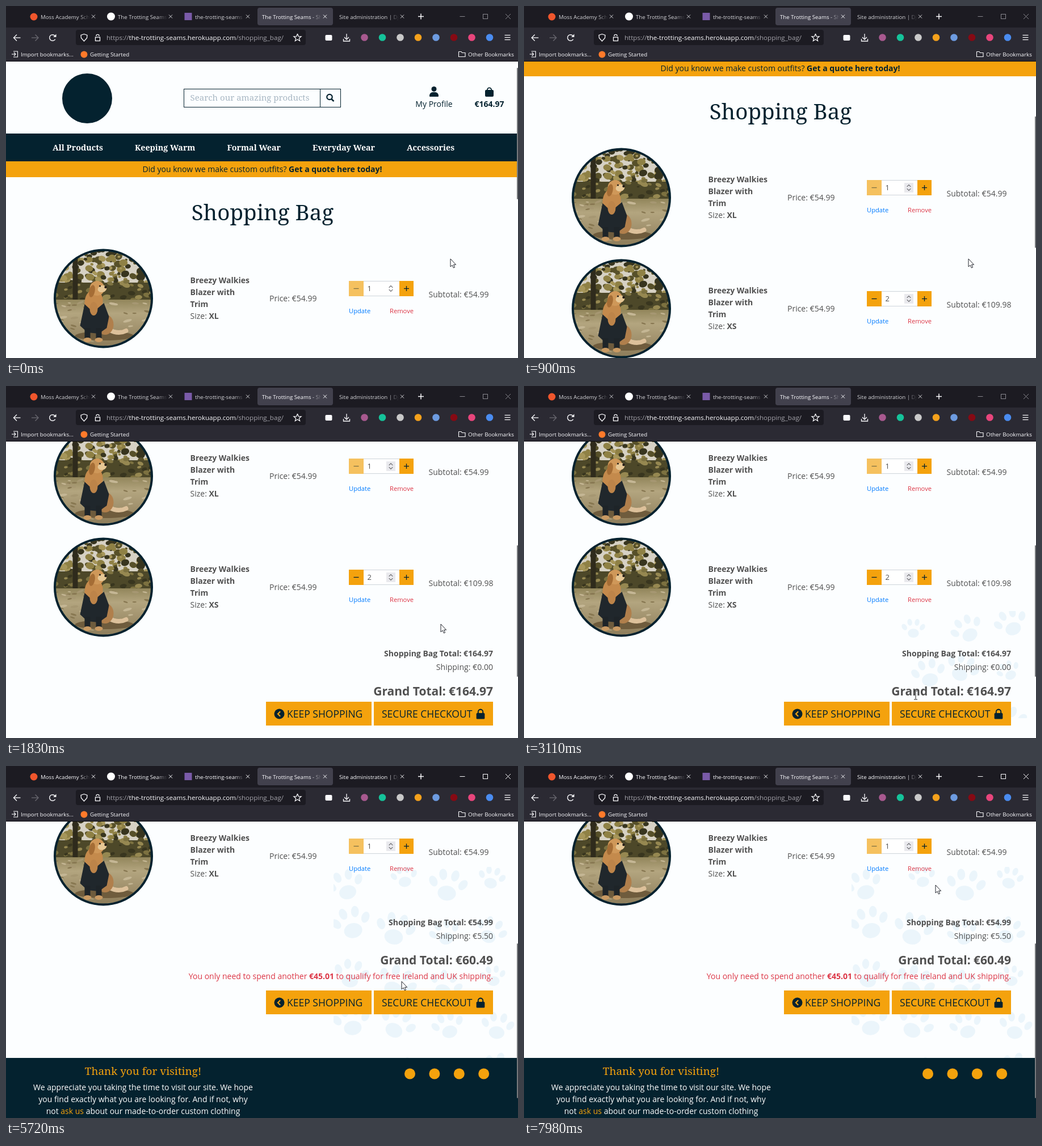
Recreate the animation shown at these times as an HTML page with a canvas. Size 902 by 621 pixels, loop 8000 ms.

```html
<!DOCTYPE html>
<html lang="en">
<head>
<meta charset="utf-8">
<title>Shopping Bag</title>
<style>
html, body { margin: 0; width: 100%; height: 100%; overflow: hidden; background: #fcfeff; }
canvas { display: block; }
</style>
</head>
<body>
<canvas id="stage" width="902" height="621"></canvas>
<script>
const g = document.getElementById('stage').getContext('2d');
const LOOP = 8000, TICK = 120, TOP = 98, { PI, sin, cos } = Math;
const FOCUS = 5340, RELOAD = 5580, REMOVED = 5720, TOAST = 5870, FADE = 7350, GONE = 7470;
const NAVY = '#04222f', ORANGE = '#f4a20d', PAGE = '#fcfeff', GREY = '#505050',
  RED = '#dc3545', BLUE = '#007bff', UI = '#fbfbfe';
const sans = (px, weight = 400) => `${weight} ${px}px "Open Sans", sans-serif`;
const serif = (px, weight = 400) => `${weight} ${px}px "Noto Serif", serif`;
const BODY = sans(14), BOLD = sans(14, 700);
const ITEM = ['Breezy Walkies', 'Blazer with', 'Trim'];

// Motion: the picture advances in ticks, between a few [time, ...values] keys.
const onTick = t => Math.max(0, Math.floor((t - 60) / TICK) * TICK + 60);
function track(keys, t) {
  const i = keys.findIndex(k => k[0] > t);
  if (i < 0) return keys[keys.length - 1].slice(1);
  const a = keys[i - 1], b = keys[i], u = (t - a[0]) / (b[0] - a[0]);
  return a.slice(1).map((v, j) => v + (b[j + 1] - v) * u);
}
const SCROLL = [[0, 0], [540, 0], [900, 178], [1140, 295], [1260, 357]];
const CIRCLE = { from: 1860, to: 3300, x: 757, y: 503, rx: 90, ry: 63, speed: .49 * PI / 180 };
const BEFORE = [[0, 783, 446], [1380, 783, 446], [1740, 766, 420]];
const AFTER = [
  [3300, 780, 442], [3960, 616, 346], [4620, 609, 343], [4740, 661, 360], [5100, 697, 380],
  [6180, 697, 380], [6420, 871, 279], [6660, 881, 193], [6900, 881, 193], [7020, 875, 203],
  [7380, 875, 203], [7740, 819, 209], [7980, 725, 210]
];
function pointerAt(t) {
  if (t < CIRCLE.from) return track(BEFORE, t);
  if (t > CIRCLE.to) return track(AFTER, t);
  const a = (t - CIRCLE.from) * CIRCLE.speed - PI / 2;
  return [CIRCLE.x + CIRCLE.rx * cos(a), CIRCLE.y + CIRCLE.ry * sin(a)];
}

function seeded(seed) {
  const next = () => (seed = seed * 16807 % 2147483647) / 2147483647;
  return (lo, hi) => lo + next() * (hi - lo);
}
function box(x, y, w, h, color) { g.fillStyle = color; g.fillRect(x, y, w, h); }
function rounded(x, y, w, h, r, color) {
  g.beginPath(); g.roundRect(x, y, w, h, r); g.fillStyle = color; g.fill();
}
function oval(x, y, rx, ry, color, turn = 0) {
  g.beginPath(); g.ellipse(x, y, rx, ry, turn, 0, 7); g.fillStyle = color; g.fill();
}
const dot = (x, y, r, color) => oval(x, y, r, r, color);
function shape(pts, color) {
  g.beginPath(); pts.forEach(p => g.lineTo(...p)); g.closePath(); g.fillStyle = color; g.fill();
}
function line(pts, color, width = 1.3) {
  g.beginPath(); pts.forEach(p => g.lineTo(...p));
  g.strokeStyle = color; g.lineWidth = width; g.stroke();
}
function ring(x, y, r, color, width = 1.3, from = 0, to = 7) {
  g.beginPath(); g.arc(x, y, r, from, to); g.strokeStyle = color; g.lineWidth = width; g.stroke();
}
function frame(x, y, w, h, color, width = 1) {
  g.strokeStyle = color; g.lineWidth = width; g.strokeRect(x + .5, y + .5, w - 1, h - 1);
}
function dash(x, y, r, color, width = 1.3) { line([[x - r, y], [x + r, y]], color, width); }
function plus(x, y, r, color, width) { dash(x, y, r, color, width); line([[x, y - r], [x, y + r]], color, width); }
function cross(x, y, r, color, width) {
  line([[x - r, y - r], [x + r, y + r]], color, width);
  line([[x - r, y + r], [x + r, y - r]], color, width);
}
// Open arrow head with its tip at x, y; dx, dy give the direction and size
function chevron(x, y, dx, dy, color, width) {
  line([[x - dx + dy, y - dy + dx], [x, y], [x - dx - dy, y - dy - dx]], color, width);
}
function text(s, x, y, font, color, align = 'left') {
  g.font = font; g.fillStyle = color; g.textAlign = align; g.fillText(s, x, y);
}
// parts: [string, font, color]; align: 0 left, .5 centre, 1 right
function rich(parts, x, y, align = 0) {
  const widths = parts.map(([s, f]) => (g.font = f, g.measureText(s).width));
  x -= align * widths.reduce((a, b) => a + b);
  parts.forEach(([s, f, c], i) => { text(s, x, y, f, c); x += widths[i]; });
}
function clipped(x, y, w, h, draw) {
  g.save(); g.beginPath(); g.rect(x, y, w, h); g.clip(); draw(); g.restore();
}
function lock(x, y, s, color) {
  const arch = [-4, 4].map(d => [x + d * s, y]);
  line([arch[0], [x - 4 * s, y - 3 * s]], color, 2 * s);
  line([arch[1], [x + 4 * s, y - 3 * s]], color, 2 * s);
  ring(x, y - 3 * s, 4 * s, color, 2 * s, PI, 2 * PI);
  rounded(x - 7 * s, y - s, 14 * s, 10 * s, 1.5 * s, color);
}

function tabs(ink) {
  const names = ['Moss Academy School', 'The Trotting Seams', 'the-trotting-seams',
    'The Trotting Seams - Shop', 'Site administration | Django'];
  rounded(443, 3, 133, 31, 4, '#42414d');
  names.forEach((name, i) => {
    const left = i * 136, x = left + (i < 3 ? 61 : 43);
    const color = i === 3 ? UI : ink;
    const fade = g.createLinearGradient(left + 130, 0, left + 148, 0);
    fade.addColorStop(0, color); fade.addColorStop(1, color + '00');
    clipped(x, 4, left + 147 - x, 30, () => text(name, x, 23, sans(9.7), fade));
    cross(left + 154, 18.5, 3, color, 1);
  });
  dot(49, 19, 6.5, '#f0562c');
  dot(185, 18.5, 7, '#ffffff');
  box(314.5, 12, 13, 13, '#7a5ba8');
  plus(731, 18.5, 5, UI, 1.5);
}
function addressBar() {
  rounded(123, 42, 405, 27, 4, '#1c1b22');
  line([[137.5, 49.5], [143, 51.5], [142.5, 56.5], [137.5, 62], [132.5, 56.5], [132, 51.5], [137.5, 49.5]], UI);
  ring(161.5, 53, 2.7, UI, 1.3, PI, 2 * PI);
  frame(157, 54.5, 9, 7.5, UI, 1.3);
  const dim = '#a4a3aa', url = sans(11.6);
  rich([['https://', url, dim], ['the-trotting-seams.herokuapp.com', url, UI], ['/shopping_bag/', url, dim]], 177, 60);
  const star = Array.from({ length: 11 }, (_, i) => {
    const r = i % 2 ? 3 : 7, a = i * PI / 5 - PI / 2;
    return [513.5 + r * cos(a), 56 + r * sin(a)];
  });
  line(star, UI, 1.2);
}
function chrome(focused) {
  const ctl = focused ? UI : '#88878e';
  box(0, 0, 902, 38, '#1c1b22');
  box(0, 38, 902, 60, '#2b2a33');
  box(0, 97, 902, 1, '#0d0c12');
  tabs(focused ? UI : '#d2d2d6');
  dash(804, 18.5, 4.5, ctl, 1);
  frame(840, 14, 9, 9, ctl);
  cross(884.5, 18.5, 4.5, ctl, 1);

  dash(19.5, 56, 6, UI); chevron(13.5, 56, -5.5, 0, UI);
  dash(51, 56, 6, '#6b6a72'); chevron(57, 56, 5.5, 0, '#6b6a72');
  ring(82, 56, 5.3, UI, 1.4, .5, 5.6);
  shape([[88.5, 49.5], [88.5, 54.8], [83.2, 54.8]], UI);
  addressBar();
  rounded(562.5, 51, 12, 10, 2, UI);
  line([[600, 49], [600, 59]], UI); chevron(600, 59, 0, 4, UI);
  line([[594.5, 58], [594.5, 62], [605.5, 62], [605.5, 58]], UI);
  ['#a8598f', '#15c39a', '#c9c9c9', '#f5a11c', '#6d9be0', '#860a14', '#e8457c', '#4a8cf0']
    .forEach((color, i) => dot(631.5 + i * 31.5, 55.5, 6.3, color));
  for (let y = 51.5; y < 60; y += 4) dash(883.5, y, 5, UI, 1.2);

  line([[13, 80], [20.5, 80], [20.5, 90], [13, 90]], UI, 1.1);
  dash(13.5, 85, 3.5, UI, 1.1); chevron(17, 85, 3, 0, UI, 1.1);
  text('Import bookmarks...', 26, 89, sans(9.8), UI);
  dot(137.5, 85.5, 6, '#ff7a2a');
  text('Getting Started', 148, 89, sans(9.8), UI);
  line([[797.5, 80.5], [802, 80.5], [803.5, 82.5], [809, 82.5], [809, 89.5], [797.5, 89.5], [797.5, 80.5]], UI, 1.1);
  text('Other Bookmarks', 814, 89, sans(9.8), UI);
}

function paw(x, y, s, turn) {
  const color = '#ebf5fb';
  g.save(); g.translate(x, y); g.rotate(turn);
  oval(0, s * .3, s * .42, s * .34, color);
  [-1.15, -.38, .38, 1.15].forEach(a =>
    oval(sin(a) * s * .75, s * .12 - cos(a) * s * .7, s * .18, s * .26, color, a * .5));
  g.restore();
}
function paws(x, y, w, h, seed) {
  const rnd = seeded(seed), step = 84;
  clipped(x, y, w, h, () => {
    for (let py = y + 30; py < y + h + 30; py += step)
      for (let px = x + 36; px < x + w + 36; px += step)
        paw(px + rnd(-14, 14), py + rnd(-14, 14), rnd(22, 40), rnd(-.7, .7));
  });
}

function speckle(rnd, count, top, bottom, flat, colors) {
  for (let i = 0; i < count; i++) {
    const r = rnd(2, 8);
    oval(rnd(-88, 88), rnd(top, bottom), r, r * flat, colors[i % colors.length], rnd(-.4, .4));
  }
}
function dog() {
  oval(2, 66, 52, 8, '#6f5c3d');
  g.beginPath(); g.moveTo(10, 55); g.quadraticCurveTo(26, 64, 40, 57);
  g.lineWidth = 8; g.lineCap = 'round'; g.strokeStyle = '#dcc09a'; g.stroke();
  oval(3, 46, 15, 18, '#b07f4c');
  oval(-17, 6, 16, 22, '#c48a4c', .1);
  shape([[-33, 10], [-18, 24], [1, 8], [10, 32], [6, 52], [-8, 62], [-28, 60], [-41, 48]], '#20272c');
  oval(-17, 18, 7, 12, '#bd8449');
  [-28, -8].forEach(x => { box(x - 5, 52, 10, 20, '#1e2428'); oval(x, 73, 7, 4, '#c99a63'); });
  oval(-11, -18, 13, 13, '#cf9859');
  oval(-2, -17, 8, 6, '#e6c795', -.3);
  oval(-20, -13, 5, 11, '#a56d35', .2);
  dot(4, -20, 2.2, '#251d17'); dot(-6, -22, 1.6, '#251d17');
}
function photo(x, y, scale) {
  const rnd = seeded(77);
  g.save(); g.translate(x, y); g.scale(scale, scale);
  const ground = g.createLinearGradient(0, 0, 0, 88);
  ground.addColorStop(0, '#8f8358'); ground.addColorStop(.3, '#b3a57f'); ground.addColorStop(1, '#8b7a58');
  box(-88, -88, 176, 90, '#d6d1c4');
  speckle(rnd, 150, -88, -22, .8, ['#575029', '#8f8145', '#38351f', '#a6965a']);
  box(-88, -28, 176, 32, '#4d4829');
  speckle(rnd, 45, -32, 2, .6, ['#7c7140', '#39361f', '#968851']);
  box(-54, -88, 9, 92, '#2f2b1c');
  box(-88, 2, 176, 86, ground);
  speckle(rnd, 70, 6, 88, .3, ['#c4b694', '#877751', '#a69772']);
  dog();
  g.restore();
}

function item(y, size, qty, subtotal, hovered) {
  g.save();
  g.beginPath(); g.arc(171.5, y, 86, 0, 7); g.clip();
  photo(171.5, y, 1);
  g.restore();
  ring(171.5, y, 85.5, NAVY, 4);
  ITEM.forEach((s, i) => text(s, 324.5, y - 27 + i * 21, BOLD, GREY));
  rich([['Size: ', BODY, GREY], [size, BOLD, GREY]], 324.5, y + 36);
  text('Price: €54.99', 464, y + 5, BODY, GREY);
  box(630, y - 31, 63, 27, '#ffffff');
  frame(629, y - 31, 65, 27, '#ced4da');
  box(604, y - 31, 26, 27, qty > 1 ? ORANGE : '#f5c15f');
  box(693, y - 31, 25, 27, ORANGE);
  dash(617, y - 17.5, 4.5, qty > 1 ? NAVY : '#7d7244');
  plus(705.5, y - 17.5, 4.5, NAVY);
  text(qty, 636.5, y - 13, sans(13), GREY);
  if (hovered) box(670, y - 26, 16, 17, '#e9e9ed');
  chevron(678, y - 22.5, 0, -3.3, '#66666a', 1.1);
  chevron(678, y - 12.5, 0, 3.3, '#66666a', 1.1);
  text('Update', 604, y + 26, sans(11.2), BLUE);
  text('Remove', 676, y + 26, sans(11.2), RED);
  text('Subtotal: ' + subtotal, 744.5, y - 2, BODY, GREY);
}

function header() {
  dot(143, 163, 44, NAVY);
  frame(313, 146, 277, 33, NAVY);
  box(553, 146, 1, 33, NAVY);
  text('Search our amazing products', 324.5, 167, serif(15), '#a9b8c4');
  ring(570, 160.5, 4.7, NAVY, 2.2); line([[573.3, 164], [577.5, 168.2]], NAVY, 2.6);
  dot(754, 146.5, 4.5, NAVY);
  rounded(746, 152, 16, 8, [6, 6, 1, 1], NAVY);
  text('My Profile', 754, 178, BODY, NAVY, 'center');
  rounded(844, 148, 15, 12, 2, NAVY);
  ring(851.5, 148, 3.6, NAVY, 1.8, PI, 2 * PI);
  text('€164.97', 851.5, 178, BOLD, NAVY, 'center');
  box(0, 225, 902, 49, NAVY);
  let x = 82;
  for (const s of ['All Products', 'Keeping Warm', 'Formal Wear', 'Everyday Wear', 'Accessories']) {
    text(s, x, 255, serif(14.3, 700), '#ffffff');
    x += g.measureText(s).width + 56;
  }
  box(0, 274, 902, 28, ORANGE);
  rich([['Did you know we make custom outfits? ', BODY, NAVY], ['Get a quote here today!', BOLD, NAVY]], 451.5, 293, .5);
  text('Shopping Bag', 452, 378, serif(38.5), NAVY, 'center');
}

function buttons(y) {
  box(458, y, 186, 42, ORANGE); box(648, y, 210, 42, ORANGE);
  dot(481.5, y + 21.5, 9, NAVY);
  chevron(479, y + 21.5, -4.2, 0, ORANGE, 2.2);
  text('KEEP SHOPPING', 495, y + 28, sans(17.5), NAVY);
  text('SECURE CHECKOUT', 662, y + 28, sans(17.5), NAVY);
  lock(836, y + 21, 1.05, NAVY);
}
function totals(y, sum, shipping, grand) {
  text('Shopping Bag Total: ' + sum, 858, y, BOLD, GREY, 'right');
  text('Shipping: ' + shipping, 858, y + 24, BODY, GREY, 'right');
  text('Grand Total: ' + grand, 858, y + 69, sans(21, 700), GREY, 'right');
}
function footer(y) {
  box(0, y, 902, 200, NAVY);
  text('Thank you for visiting!', 241.5, y + 30, serif(18.9), ORANGE, 'center');
  const white = s => [s, BODY, '#ffffff'];
  [
    [white('We appreciate you taking the time to visit our site. We hope')],
    [white('you find exactly what you are looking for. And if not, why')],
    [white('not '), ['ask us', BODY, ORANGE], white(' about our made-to-order custom clothing')]
  ].forEach((parts, i) => rich(parts, 241.5, y + 57 + i * 21, .5));
  for (let i = 0; i < 4; i++) dot(711.5 + i * 43.4, y + 28, 9.5, ORANGE);
}

function toast(alpha, hover) {
  const small = sans(12.25), strong = sans(12.25, 700), tiny = sans(9.8), title = serif(13.1);
  g.save(); g.globalAlpha = alpha;
  g.save(); g.shadowColor = 'rgba(0,0,0,.18)'; g.shadowBlur = 8; g.shadowOffsetY = 3;
  box(586, 186, 305, 353, '#fdfeff'); g.restore();
  box(586, 185.5, 305, 2, '#28a745');
  text('Success!', 597, 207, title, NAVY);
  cross(874.5, 202.5, 4, hover ? '#303030' : '#9a9a9a', 1.6);
  text(`You removed XS ${ITEM[0]} ${ITEM[1]}`, 597, 244, title, NAVY);
  text(ITEM[2] + ' from your shopping bag', 597, 263, title, NAVY);
  text('Your Shopping Bag:', 597, 298, small, NAVY);
  clipped(597, 324, 51, 34, () => photo(622.5, 340, .31));
  text(ITEM.join(' '), 674, 334, small, GREY);
  text('Size: XL', 674, 350, tiny, GREY);
  text('Quantity: 1', 674, 365, tiny, GREY);
  text('Total (Exc. shipping)', 597, 436, strong, NAVY);
  text('€54.99', 880, 436, strong, NAVY, 'right');
  box(597, 444, 283, 51, NAVY);
  rich([['Spend ', small, '#fff'], ['€45.01', strong, '#ffc107'], [' more to get free shipping to the', small, '#fff']], 738.5, 465, .5);
  text('UK and Ireland.', 738.5, 483, small, '#fff', 'center');
  box(597, 495, 283, 33, ORANGE);
  text('GO TO SECURE CHECKOUT', 643, 517, BODY, NAVY);
  lock(828, 510.5, .8, NAVY);
  g.restore();
}

function outline(pts) {
  shape(pts, '#ffffff');
  line([...pts, pts[0]], '#20242c', 1);
}
function pointer(t) {
  const [x, y] = pointerAt(onTick(t)), listed = t < RELOAD;
  const over = (bx, by, w, h) => x > bx && x < bx + w && y > by && y < by + h;
  const onLink = listed
    ? over(648, 557, 210, 42) || over(604, 324, 26, 27) || over(676, 370, 42, 14)
    : t < GONE && over(868, 196, 12, 12);
  g.save(); g.translate(Math.round(x), Math.round(y));
  if (listed && over(646, 526, 212, 26)) {
    line([[0, -6], [0, 7]], '#222', 1);
    dash(0, -7, 3, '#222', 1); dash(0, 8, 3, '#222', 1);
  } else if (onLink) {
    outline([[-1.5, 0], [1, 0], [1, 6], [8, 7.5], [9, 9], [8, 16], [0, 16], [-5, 9.5], [-3.5, 8], [-1.5, 10]]);
  } else {
    outline([[0, 0], [0, 14], [3.2, 11.2], [5.4, 16], [7.6, 15], [5.5, 10.3], [9.6, 10.3]]);
  }
  g.restore();
}

function page(t) {
  const scroll = Math.round(track(SCROLL, onTick(t))[0]), removed = t >= REMOVED;
  box(0, TOP, 902, 523, PAGE);
  if (t >= RELOAD && !removed) return;
  if (removed) paws(577, 178, 325, 337, 5);
  else if (t >= CIRCLE.from + TICK) paws(664, 397, 238, 189, 12);

  g.save(); g.translate(0, -scroll);
  header();
  item(516, 'XL', 1, '€54.99', scroll > 0);
  if (removed) {
    totals(638, '€54.99', '€5.50', '€60.49');
    rich([['You only need to spend another ', BODY, RED], ['€45.01', BOLD, RED],
      [' to qualify for free Ireland and UK shipping.', BODY, RED]], 858, 733, 1);
    buttons(753);
    footer(872);
  } else {
    item(712, 'XS', 2, '€109.98', scroll > 0);
    totals(834, '€164.97', '€0.00', '€164.97');
    buttons(914);
  }
  g.restore();

  if (removed) rounded(900, 313, 2, 273, 1, '#76797c');
  else rounded(900, 109 + scroll * .482, 2, 232, 1, '#76797c');
  if (t >= TOAST && t < GONE) toast(t < FADE ? 1 : .5, t >= 6980);
}

function tick(now) {
  const t = now % LOOP;
  clipped(0, TOP, 902, 523, () => page(t));
  chrome(t >= FOCUS);
  pointer(t);
  requestAnimationFrame(tick);
}
requestAnimationFrame(tick);
</script>
</body>
</html>
```
